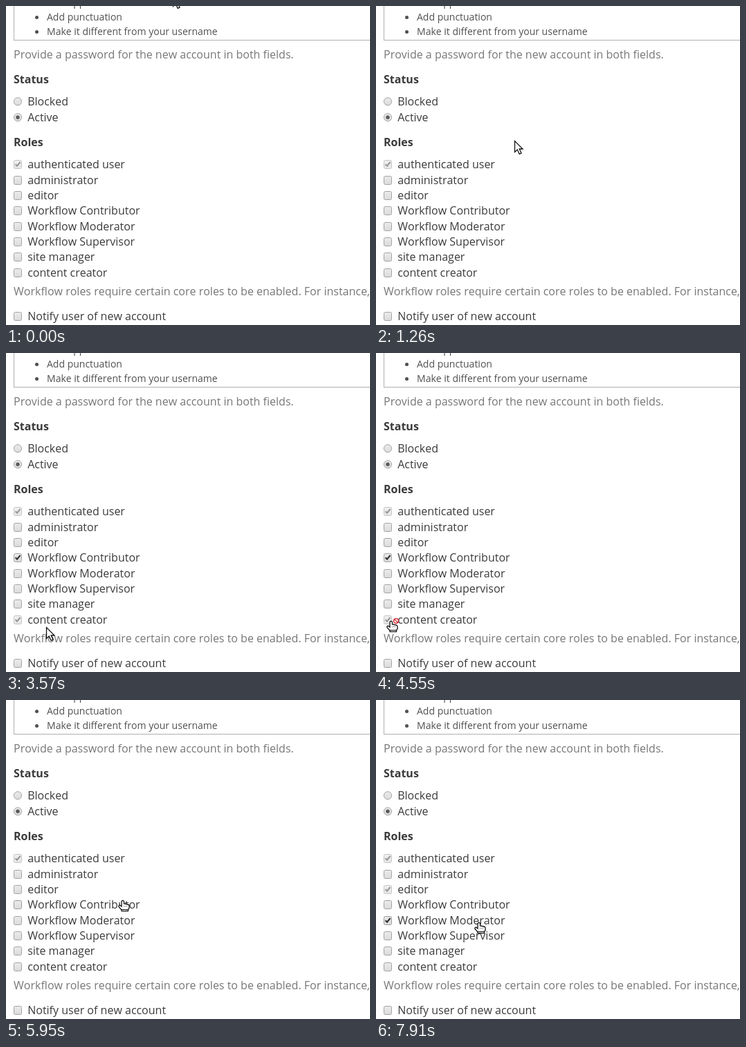
An HTML page with a canvas that plays this animation: 526x462 px, repeating every 8 s.

```html
<!DOCTYPE html>
<html lang="en">
<head>
<meta charset="utf-8">
<title>Account roles form</title>
<style>
  html, body { margin: 0; width: 100%; height: 100%; overflow: hidden; background: #fff; }
  canvas { display: block; }
</style>
</head>
<body>
<canvas id="stage" width="526" height="462"></canvas>
<script>
const ctx = document.getElementById('stage').getContext('2d');
const LOOP = 8000, STEP = 70;
const FAMILY = '"Open Sans", "Noto Sans", sans-serif';
const DARK = '#3b3b3b', SOFT = '#777', LIST = '#505050';

// Plain advances: no kerning or ligatures.
ctx.fontKerning = 'none';
ctx.textRendering = 'optimizeSpeed';

// Time spans in which a box is ticked; locked boxes are greyed while ticked.
const rows = [
  { text: 'authenticated user', y: 229, from: 0, to: LOOP, locked: true },
  { text: 'administrator', y: 252 },
  { text: 'editor', y: 274, from: 7840, to: LOOP, locked: true },
  { text: 'Workflow Contributor', y: 296, from: 2030, to: 5880 },
  { text: 'Workflow Moderator', y: 319, from: 7700, to: LOOP },
  { text: 'Workflow Supervisor', y: 341 },
  { text: 'site manager', y: 363 },
  { text: 'content creator', y: 386, from: 2030, to: 5880, locked: true },
  { text: 'Notify user of new account', y: 449 }
];

// Pointer path: time, x, y
const path = [
  [140, 241, -16], [560, 226, 54], [1680, 184, 280], [1890, 180, 297],
  [3010, 180, 297], [3290, 140, 345], [3570, 58, 397], [3850, 28, 394],
  [4130, 46, 397], [4550, 22, 388], [4620, 22, 388], [5040, 90, 340],
  [5460, 168, 291], [5600, 169, 290], [6230, 169, 290], [6440, 175, 300],
  [6510, 175, 300], [6650, 170, 302], [6790, 170, 302], [7490, 149, 322]
];

function pointerAt(t) {
  const i = path.findIndex(p => p[0] > t);
  if (i === 0) return path[0].slice(1);
  if (i < 0) return path[path.length - 1].slice(1);
  const [t0, x0, y0] = path[i - 1], [t1, x1, y1] = path[i];
  const k = (t - t0) / (t1 - t0);
  return [Math.round(x0 + (x1 - x0) * k), Math.round(y0 + (y1 - y0) * k)];
}

function text(str, x, y, size = 16, color = DARK, weight = 400) {
  ctx.font = `${weight} ${size}px ${FAMILY}`;
  ctx.fillStyle = color;
  ctx.fillText(str, x, y);
}

function disc(x, y, r, color) {
  ctx.fillStyle = color;
  ctx.beginPath();
  ctx.arc(x, y, r, 0, Math.PI * 2);
  ctx.fill();
}

function face(y, locked) {
  const g = ctx.createLinearGradient(0, y - 6, 0, y + 7);
  g.addColorStop(0, locked ? '#f1f1f1' : '#ececec');
  g.addColorStop(1, locked ? '#e6e6e6' : '#dadada');
  return g;
}

function checkbox(y, on, locked, hover) {
  ctx.beginPath();
  ctx.roundRect(11.5, y - 5.5, 11, 12, 2);
  ctx.fillStyle = face(y, locked);
  ctx.fill();
  ctx.lineWidth = 1;
  ctx.strokeStyle = locked ? '#c4c4c4' : hover ? '#989898' : '#a3a3a3';
  ctx.stroke();
  if (!on) return;
  ctx.beginPath();
  ctx.moveTo(13.6, y + .2);
  ctx.lineTo(16, y + 2.6);
  ctx.lineTo(20.6, y - 3);
  ctx.lineWidth = 2.1;
  ctx.strokeStyle = locked ? '#999' : '#333';
  ctx.stroke();
}

function radio(y, on) {
  disc(17, y + .3, 5.6, face(y));
  ctx.lineWidth = 1;
  ctx.strokeStyle = '#a3a3a3';
  ctx.stroke();
  if (on) disc(17, y + .3, 2.7, '#5a5a5a');
}

function outline(d) {
  const shape = new Path2D(d);
  ctx.fillStyle = '#fff';
  ctx.fill(shape);
  ctx.lineWidth = 1.3;
  ctx.strokeStyle = '#111';
  ctx.stroke(shape);
}

function arrow() {
  outline('M.5 .5V16.5L4.3 13L7.2 19.4L10 18.2L7.2 12H12Z');
}

function hand(banned) {
  outline('M-2 9V2Q-2 .5 -.3 .5Q1.5 .5 1.5 2V5L7 6Q9 6.4 9 8.3V11.5L7.5 13.5V15.7H-2V14L-6 9.5Q-6.6 7.2 -4.4 7.2Z');
  ctx.fillStyle = '#555';
  for (let x = 1; x < 7; x += 2) ctx.fillRect(x, 8, 1, 1);
  ctx.fillStyle = '#111';
  ctx.fillRect(-2, 13, 9.5, 1);
  if (!banned) return;
  disc(7, 0, 3.4, '#fff');
  ctx.lineWidth = 1.3;
  ctx.strokeStyle = '#cf1d24';
  ctx.moveTo(4.6, -2.4);
  ctx.lineTo(9.4, 2.4);
  ctx.stroke();
}

function drawPage() {
  ctx.fillStyle = '#fff';
  ctx.fillRect(0, 0, 526, 462);

  ctx.fillStyle = '#b0b0b0';
  ctx.fillRect(11, 0, 1, 50);
  ctx.fillRect(11, 49, 515, 1);
  text('Add uppercase letters', 59, 0, 14, LIST);
  text('Add punctuation', 59, 21, 14, LIST);
  text('Make it different from your username', 59, 42, 14, LIST);
  disc(44.5, 16.5, 2.5, LIST);
  disc(44.5, 37.5, 2.5, LIST);

  text('Provide a password for the new account in both fields.', 11, 76, 16, SOFT);
  text('Status', 11, 112, 16, DARK, 700);
  radio(138, false);
  text('Blocked', 31.16, 144);
  radio(161, true);
  text('Active', 31.16, 167);
  text('Roles', 11, 203, 16, DARK, 700);
  text('Workflow roles require certain core roles to be enabled. For instance,', 11, 419, 16, SOFT);
}

function draw(t) {
  drawPage();
  const [px, py] = pointerAt(t);
  let cursor = arrow;
  for (const row of rows) {
    const on = t >= row.from && t < row.to;
    const locked = on && !!row.locked;
    text(row.text, 31.16, row.y + 6);
    const end = 31.16 + ctx.measureText(row.text).width;
    const hover = px >= 11 && px <= end && Math.abs(py - row.y) < 10.9;
    checkbox(row.y, on, locked, hover);
    if (hover) cursor = () => hand(locked);
  }
  ctx.save();
  ctx.translate(px, py);
  cursor();
  ctx.restore();
}

function tick() {
  const t = performance.now() % LOOP;
  draw(Math.floor(t / STEP) * STEP);
  requestAnimationFrame(tick);
}
tick();
</script>
</body>
</html>
```
